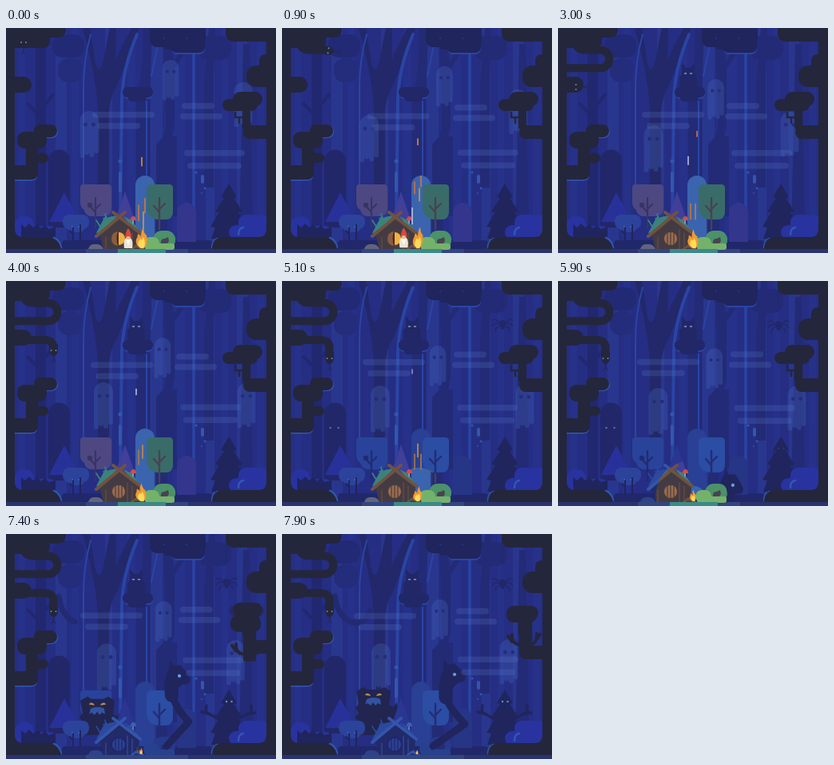
Write an HTML page that moves like this. It is 338 by 282 pixels and loops after 8000 ms.

```html
<!DOCTYPE html>
<html lang="en">
<head>
<meta charset="utf-8">
<title>Night forest</title>
<style>
html, body { margin: 0; width: 100%; height: 100%; overflow: hidden; background: #24263c }
svg { display: block; width: 100vw; height: 100vh }
</style>
</head>
<body>
<svg id="stage" viewBox="0 0 338 282"></svg>
<script>
const INK = '#24263c', NAVY = '#20255d', DUSK = '#212767', GLOW = '#2a45a4', EDGE = '#3157ae', LEDGE = '#2833a0';

// Markup helpers
const box = (x, y, w, h, r, fill, more = '') =>
  `<rect x="${x}" y="${y}" width="${w}" height="${h}" rx="${r}" fill="${fill}" ${more}/>`;
const shape = (d, fill, more = '') => `<path d="${d}" fill="${fill}" ${more}/>`;
const line = (d, color, width, more = '') =>
  `<path d="${d}" fill="none" stroke="${color}" stroke-width="${width}" stroke-linecap="round" ${more}/>`;
const dot = (x, y, r, fill, more = '') => `<circle cx="${x}" cy="${y}" r="${r}" fill="${fill}" ${more}/>`;
const eyes = (x1, x2, y, r, fill) => dot(x1, y, r, fill) + dot(x2, y, r, fill);
const group = (id, body, more = '') => `<g id="${id}" ${more}>${body}</g>`;
const clipped = (clip, body) => `<g clip-path="url(#${clip})">${body}</g>`;

const lit = {
  mauve: '#4d4882', mauveWood: '#393463', column: '#3b64ae', green: '#396c68', wood: '#4a4250',
  peak: '#413f98', hump: '#33368c', beam: '#70523f', wall: '#433b43', moss: '#3b827b',
  door: '#9a6d50', plank: '#4c3b3d', bush: '#4b9169', bush2: '#74b26c', stone: '#62647a',
  cap: '#cf4f4a', ground: '#3d8988'
};
const unlit = {
  mauve: '#29439a', mauveWood: '#222a70', column: '#294094', green: '#2b4da4', wood: '#242d74',
  peak: '#2a3692', hump: '#273586', beam: '#3355aa', wall: '#222a68', moss: '#2b4a9f',
  door: '#2a4292', plank: '#20266a', bush: '#26398a', bush2: '#28418e', stone: '#2d428a',
  cap: '#3a61b4', ground: '#334580'
};

const trees = c =>
  shape('M162 266V197a12 12 0 0 1 24 0V266z', c.column) +
  shape('M214 268V231a12 12 0 0 1 24 0V268z', c.hump) +
  shape('M93 200q0-4 4-4h30q5 0 5 5v24q0 11-11 11h-13q-8 0-10-8-5-3-5-10z', c.mauve) +
  line('M112 213V250M112 231l-7-8M112 227l6-6', c.mauveWood, 2.2) + dot(105, 222, 3.2, c.mauveWood) +
  shape('M176 202q0-6 6-6h22q5 0 5 5v29q0 10-10 10h-7q-16 0-16-17z', c.green) +
  line('M192 213V252M192 231l-7-8M192 227l7-7', c.wood, 2.4);

const house = c =>
  shape('M149 205l12 35h-24z', c.peak) +
  box(184, 254, 28, 23, 11, c.bush) + box(172, 262, 20, 16, 8, c.bush2) + box(174, 270, 37, 8, 3, c.bush2) +
  shape('M194 268q0-4 5-4l4-2 1 5-2 3h-8z', c.wood) +
  shape('M103 277q2-7 9-6 7-1 10 6z', c.stone) +
  shape('M141 235L117 259 122 277H165L167 258z', c.wall) +
  shape('M113 257L122 240q7-4 18-5L120 256z', c.moss) + shape('M147 236l10 5 10 13-8-3z', c.moss) +
  line('M149 231L113 261', c.beam, 4) + line('M134 231L168 257', c.beam, 4) +
  line('M118 249l-5-8M126 242l-2-9M122 239l4-2', c.moss, 1.6) +
  line('M159 241v4', '#d8d7d0', 1.2, 'opacity=".6"') + shape('M155.5 241q1-5 4-5 3 0 3.5 5z', c.cap) +
  dot(141, 264, 10, c.plank) + dot(141, 264, 8, c.door) +
  line('M137 257v14M141 256v16M145 257v14', c.plank, 1.2) +
  line('M152 253v24M158 257v20M125 262v15', c.beam, 1) +
  line('M157 277l8-5M162 273l10 4', c.beam, 2.5) +
  box(140, 277, 60, 5, 0, c.ground);

const backdrop = () => {
  const stripes = [[16, 8], [62, 14], [82, 9], [124, 9], [152, 10], [181, 15], [209, 15], [250, 11], [270, 8], [289, 13], [314, 10]];
  return box(0, 0, 338, 282, 0, '#252e83') +
    stripes.map(([x, w], i) => box(x, 0, w, 270, 0, i % 2 ? '#29368d' : '#263189')).join('') +
    box(37, 0, 13, 265, 0, '#21286f') + line('M37 105l-10-10M50 95l9-12', '#21286f', 4) +
    shape('M96 0h9l7 45q4 13 9 0l9-45h8l-1 40 20-40h10L139 72q-9 15-10 32v130h-14V104q-1-40-19-104z', '#222869') +
    shape('M171 0h12l-3 95v140h-17V90q10-40 8-90z', '#232b76') +
    shape('M197 0h8l5 42 20-32 5 5-24 36v70q-2 16-9 24v125h-14V145q14-8 12-30z', '#232b76') +
    shape('M254 0h8l-2 60v140h-12V70zM297 20h8l4 240h-17z', '#232b76') +
    line('M106 8Q97 40 97 75V215', GLOW, 2) + line('M164 8Q146 50 145 90L143 238', GLOW, 4) +
    line('M176 92V200M194 2l-12 58', GLOW, 2) + line('M235 30V268', GLOW, 3.5) +
    box(58, 8, 40, 29, 13, '#222a75') + box(65, 38, 30, 30, 13, '#242c7c') +
    box(240, 10, 42, 30, 13, '#232b76') +
    shape('M190 235V150q0-14 14-14h10v100z', '#232a76') +
    dot(143, 167, 2.5, EDGE) + box(141, 180, 4, 26, 2, EDGE) +
    dot(238, 181, 1.6, EDGE) + box(244, 184, 4, 11, 2, EDGE) + dot(249, 201, 1.4, EDGE) + dot(245, 207, 1, EDGE);
};

const ghost = id => group(id,
  shape('M-12 12A12 12 0 0 1 12 12V50a3 3 0 0 1-6 0v-4 9a3 3 0 0 1-6 0v-8 5a3 3 0 0 1-6 0v-7 11a3 3 0 0 1-6 0z', '#4a6cc4', 'opacity=".28"') +
  eyes(-5, 5, 17, 2.4, '#252d78'));

const bars = (id, a, b) => group(id,
  [a, b].map(([x, y, w]) => box(x, y, w, 7.5, 3.75, '#5b7cc8', 'opacity=".22"')).join(''));

const monster = group('monster',
  shape('M97 262V244l-5-3 4-6-5-5 5-5-4-7 4-5-3-16 9-5 5 3h15l6-3 8 5-2 17 5 3 5-6 1 8 6-2-2 8 4 4-4 6 3 5-5 4V262z', '#21254f') +
  shape('M104 202q1-4 6-1l1 2zM125 202q-1-4-6-1l-1 2z', '#b5884f') +
  shape('M106 207q9-4 17 0l1 7-4-2-3 3-3-4-3 4-4-3-3 2z', '#3353a0'));

const pine = group('arms', line('M268 233l-18-10 1-8M256 226l-11-3M288 233l19-10v-8M301 226l11-2', NAVY, 3.5)) +
  shape('M279 195l10 17-4 1 11 17-5 1 11 18-6 1 5 14h-44l5-14-6-1 11-18-5-1 11-17-4-1z', NAVY) +
  group('pineEyes', eyes(276, 282.5, 210, 1.2, '#5e8fd2'));

const leftFrame =
  box(11, 236, 24, 28, 10, LEDGE) + box(13, 248, 50, 18, 9, LEDGE) +
  group('peeker', shape('M19 250V223l6 5h5l6-1 7-4v27z', INK) + line('M24.5 234l3 1M37 234l-3 1', '#a9a99f', 1.6)) +
  shape('M19 263V246l5 4 5-5 5 5 5-4 5 5 5-4 4 5 9-2v13z', NAVY) +
  line('M60 263q7 3 9 12', EDGE, 2.5) +
  shape('M0 0H11V252q0 10 11 10H52q14 1 17 15H0z', INK) +
  box(-20, -12, 95, 24, 9, INK) + box(-10, 4, 65, 21, 8, INK) + box(0, 61, 32, 20, 10, INK) +
  box(38, 122, 27, 16, 8, EDGE) + box(35, 121, 29, 16, 8, INK) +
  box(14, 130, 37, 21, 9, INK) + box(25, 140, 15, 44, 5, INK) + box(36, 157, 17, 12, 6, INK) +
  shape('M11 185h28q0 6.5-8 6.5H11z', EDGE) + box(-5, 172, 45, 18, 8, INK);

const rightFrame =
  box(291, 234, 40, 32, 9, LEDGE) + box(279, 247, 40, 18, 9, LEDGE) +
  line('M258 275q0-8 7-11M291 259q0-8 6-9', EDGE, 2.5) +
  shape('M338 0H326V252q0 10-10 10H270q-12 2-12 15h80z', INK) +
  box(275, -12, 80, 29, 9, INK) + box(301, 47, 40, 27, 12, INK) + box(317, 33, 25, 25, 8, INK) +
  group('canopy', box(271, 89, 44, 15, 7.5, INK) + line('M287 106v6h10M292 119v-6', INK, 2.5)) +
  box(284, 80, 37, 18, 9, INK, 'id="crown"') + shape('M296 96h10v30h-10z', INK) +
  group('ledge', box(297, 122, 50, 17, 8, INK)) +
  group('stump', box(281, 90, 38, 21, 9, INK) + box(297, 100, 16, 48, 3, INK) +
    line('M301 139q-14 0-13-13M288 135l-5-7M310 139q10-2 9-14M319 132l4-6', INK, 4));

const ground = box(0, 277, 338, 5, 0, '#29336d') + box(100, 277, 128, 5, 0, '#334580');

const snake = line('M22 4V16Q22 27.5 34 27.5H53A11.4 11.4 0 0 1 53 50.3H4V74H48Q59.5 74 59.5 84V95', INK, 10, 'id="snake"') +
  group('head', shape('M-6-5.5H1q8 1 8 5.5t-8 5.5H-6z', INK) +
    line('M9 0h5l3-2.5M14 0l3 2.5', INK, .9) + dot(2, -3, 1, '#7088a8') + dot(2, 3, 1, '#7088a8'));

const gnome = group('gnome',
  shape('M-5 24q-2-13 5-14 7 1 5 14z', '#e9e5d9') + shape('M-4 11q1-9 4-12 4 5 4 12z', '#d5493f') +
  dot(0, 11.5, 2.6, '#e9b992') + shape('M-3 13h6l-3 8z', '#fff8e9'));

const fire = group('fire',
  shape('M0 0q-8-4-6-11 2-3 2-7 3 1 4 4 0-8 3-12 0 7 4 10 2 10-3 16z', '#f19a32') +
  shape('M0 0q-5-3-3-8l2-4 2 2 2-4q4 9 0 14z', '#ffdc5a'));

// [x, birth in s, life in s, colour]
const sparks = [[170, -2.3, 4.7, '#e49a2c'], [174, -.6, 4.1, '#de7b2c'], [166, -.35, 2, '#d8742f'], [172, -.1, 1.5, '#e49a2c'],
  [163, .65, 4.8, '#bfc9e4'], [168, 1.35, 1.4, '#d99a45'], [166, 2.6, .9, '#d8742f'], [172, 2.6, .8, '#e08a2f'],
  [166, 3.35, 1.2, '#b67a42'], [171, 3.15, 1.4, '#d48a35'], [170, 4.2, 1.4, '#d99a35'], [174, 4.6, 1, '#c08035'], [166, 4.6, 1, '#b67a42']];

stage.innerHTML = `<defs>
  <clipPath id="light"><circle id="lamp" cx="167" cy="270"/></clipPath>
  <clipPath id="farLight"><circle id="farLamp" cx="170" cy="272"/></clipPath>
  <clipPath id="aboveCloud"><rect width="338" height="82"/></clipPath>
  <clipPath id="aboveRoof"><rect width="338" height="252"/></clipPath></defs>` +
  backdrop() + line('M66 78Q70 104 86 110T110 97', '#222a72', 7, 'id="vine" pathLength="100" stroke-dasharray="100 200"') +
  ghost('ghostA') + ghost('ghostB') + ghost('ghostC') +
  group('spider', line('M0-70V0', DUSK, .4) + dot(0, 0, 4, DUSK) + dot(0, 5, 2.5, DUSK) +
    line('M-3 0l-6-5-4 1M-3 1l-7-1-3 4M-3 3l-5 3-1 4M3 0l6-5 4 1M3 1l7-1 3 4M3 3l5 3 1 4', DUSK, 1.2)) +
  clipped('aboveCloud', group('cat', shape('M152 82V62l3-4V44l5 6h6l5-6v14l3 5v19z', DUSK) +
    line('M158.5 57h2M165.5 57h2', '#8b9cc4', 1.5))) +
  box(147, 76, 37, 13, 6, GLOW) + box(146, 74, 38, 13, 6, DUSK) + box(152, 80, 24, 12, 6, DUSK) +
  box(207, 9, 42, 24, 7, GLOW) + box(180, -10, 70, 34, 9, NAVY) + box(206, 8, 43, 23, 7, NAVY) + box(196, 14, 20, 13, 6, NAVY) +
  eyes(198, 226, 13, .7, EDGE) +
  shape('M53 250V166a13.5 13.5 0 0 1 27 0V250z', '#212769') + group('hoodEyes', eyes(60.5, 70.5, 184, 1.2, '#4f76bc')) +
  shape('M73 206l20 37H54z', '#28319a') +
  box(70, 266, 188, 12, 4, '#21286a') +
  trees(unlit) + clipped('farLight', trees(lit)) + clipped('aboveRoof', monster) +
  box(71, 234, 33, 18, 8, '#2b439a') + box(77, 242, 21, 14, 6, '#2b439a') +
  line('M84 250V266M93 247V266M84 258l-4-4', NAVY, 2) + eyes(83, 91, 249, .7, '#5d86cc') +
  house(unlit) +
  group('wolf', line('', NAVY, 9, 'id="leg" stroke-linejoin="round"') + line('', NAVY, 17, 'id="torso"') +
    group('wolfHead', shape('M-12 12L-10-14l5 7 8-2 8 8 6 8-1 6-9 3-8 8z', NAVY) + dot(3, 5, 2.1, '#67a0dc'))) +
  pine + bars('mistA', [106, 105, 78], [112, 119, 54]) + bars('mistB', [213, 94, 41], [211, 107, 53]) + bars('mistC', [218, 153, 76], [222, 169, 68]) +
  leftFrame + rightFrame + ground + clipped('light', house(lit)) +
  group('openDoor', dot(141, 264, 8, '#4a2b26') + shape('M141 256a8 8 0 0 1 0 16z', '#f0b342') +
    shape('M140 255q-8 1-8 9t8 9q-3-9 0-18', '#8b5c40')) +
  gnome + fire + sparks.map(s => line('', s[3], 1.5, 'class="spark"')).join('') + snake;

const $ = id => document.getElementById(id);
const move = (id, x, y, more = '') => $(id).setAttribute('transform', `translate(${x} ${y}) ${more}`);
const fade = (id, a) => $(id).setAttribute('opacity', a);
const sparkLines = [...document.querySelectorAll('.spark')];

// Smooth interpolation through seven poses
const TIMES = [0, 1.9, 3, 4, 5.1, 6.8, 7.9];
function pose(t, ...v) {
  const i = TIMES.findIndex(x => x > t) - 1;
  if (i < 0) return v[6];
  const slope = j => {
    const a = Math.max(j - 1, 0), b = Math.min(j + 1, 6);
    return (v[b] - v[a]) / (TIMES[b] - TIMES[a]);
  };
  const h = TIMES[i + 1] - TIMES[i], u = (t - TIMES[i]) / h, w = 1 - u;
  return w * w * (1 + 2 * u) * v[i] + u * u * (3 - 2 * u) * v[i + 1] +
    h * u * w * (w * slope(i) - u * slope(i + 1));
}
const ramp = (t, a, b) => {
  const u = Math.min(1, Math.max(0, (t - a) / (b - a)));
  return u * u * (3 - 2 * u);
};

function draw(t) {
  move('ghostA', pose(t, 104.5, 114, 119.5, 122, 123, 127.5, 124), pose(t, 104, 115, 122, 127, 131, 137, 137));
  move('ghostB', pose(t, 206, 200.5, 197.5, 196, 195, 197, 197.5), pose(t, 40, 56, 64, 71, 81, 86, 82), 'scale(.86)');
  move('ghostC', pose(t, 297, 294, 290, 301, 304, 291.5, 284), pose(t, 68, 88, 105, 128, 129, 134, 132), 'scale(.95)');
  move('mistA', pose(t, 2, -1, -1, 0, -5, -10, -16), pose(t, 0, 3, 0, -3.5, -7, -7, -6));
  move('mistB', pose(t, 7, -1, -2, 0, 2, 4, 5), pose(t, 0, 3.5, 0, -3, -5.5, -5, -1));
  move('mistC', pose(t, 5, -1, -1, 0, 1, 4, 2), pose(t, 0, -1, 0, 1.5, 2, 2.5, .5));

  move('cat', 0, 40 * (1 - ramp(t, .9, 1.7)));
  move('spider', 276, -20 + 73 * ramp(t, 4, 5) + 8 * ramp(t, 5.1, 7.9));
  fade('hoodEyes', ramp(t, 4.5, 4.8) * (1 - ramp(t, 7.1, 7.4)));
  move('peeker', 0, 32 * (1 - ramp(t, 5.9, 6.5) + ramp(t, 7, 7.6)));
  const reach = ramp(t, 5.5, 6.6);
  move('arms', 279 * (1 - reach), 0, `scale(${reach} 1)`);
  fade('pineEyes', ramp(t, 5.8, 6.2));
  move('monster', 0, 62 * (1 - ramp(t, 6.2, 6.6) * .27 - ramp(t, 6.8, 7.7) * .73));
  $('vine').setAttribute('stroke-dashoffset', 101 - 101 * ramp(t, 6.8, 7.9));
  fade('vine', t > 6.8 ? 1 : 0);

  // The right-hand tree turns into a creature
  const wake = ramp(t, 7, 7.7);
  move('canopy', 14 * wake, 0);
  fade('canopy', 1 - wake);
  move('crown', 0, 10 * wake);
  move('ledge', 0, 18 * wake);
  move('stump', 0, 30 * (1 - wake));
  fade('stump', ramp(t, 7, 7.2));

  // The wolf rises, then stretches a leg out to the left
  const lean = ramp(t, 6.8, 7.8), mix = (a, b) => a + (b - a) * lean;
  const hip = `${mix(228, 229)} ${mix(230, 238)}`, chest = `${mix(212, 205)} ${mix(197, 205)}`;
  $('leg').setAttribute('d', `M${mix(223, 189)} 266L${hip}Q${mix(222, 212)} 222 ${chest}`);
  $('torso').setAttribute('d', `M${chest}Q${mix(209, 204)} 188 ${mix(212, 208)} 178`);
  move('wolfHead', mix(217, 213), mix(176, 171), `rotate(${mix(12, 0)})`);
  move('wolf', 0, 115 * (1 - ramp(t, 5.5, 6.5)));
  fade('wolf', ramp(t, 5.5, 5.8));

  $('farLamp').setAttribute('r', 120 - 82 * ramp(t, 4.1, 5) - 38 * ramp(t, 5.1, 6.5));
  $('lamp').setAttribute('r', 75 - 60 * ramp(t, 5.1, 6.7) - 15 * ramp(t, 6.8, 7.7));
  const size = pose(t, 26, 24, 24, 24, 20, 10, 6) / 26;
  move('fire', 169, 276, `scale(${size * (1 + .06 * Math.sin(t * 19))} ${size * (1 + .08 * Math.sin(t * 23))}) skewX(${5 * Math.sin(t * 13)})`);

  move('gnome', 153 - 8 * ramp(t, .7, 1.9) - 6 * ramp(t, 1.9, 2.4), 252 + 4 * ramp(t, .8, 1.9) - Math.abs(Math.sin(t * 9)) * (t > .7 && t < 2.3));
  fade('gnome', 1 - ramp(t, 2.1, 2.4));
  fade('openDoor', 1 - ramp(t, 2.4, 2.75));

  sparks.forEach(([x, born, life], i) => {
    const age = t - born, y = 245 - 38 * age + 1.9 * age * age, half = 11 * Math.exp(-age / 3);
    sparkLines[i].setAttribute('d', age > 0 && age < life ? `M${x} ${y - half}V${y + half}` : '');
    sparkLines[i].setAttribute('opacity', Math.min(1, Math.max(0, (life - age) * 2)));
  });

  const body = $('snake'), total = body.getTotalLength();
  const at = Math.min(total, pose(t, 12, 102, 175, 221, total, total, total));
  const p = body.getPointAtLength(at), q = body.getPointAtLength(at - 2);
  body.setAttribute('stroke-dasharray', `${at} 400`);
  move('head', p.x, p.y, `rotate(${Math.atan2(p.y - q.y, p.x - q.x) * 180 / Math.PI})`);
}

const start = performance.now();
function tick() {
  draw((performance.now() - start) % 8000 / 1000);
  requestAnimationFrame(tick);
}
tick();
</script>
</body>
</html>
```
